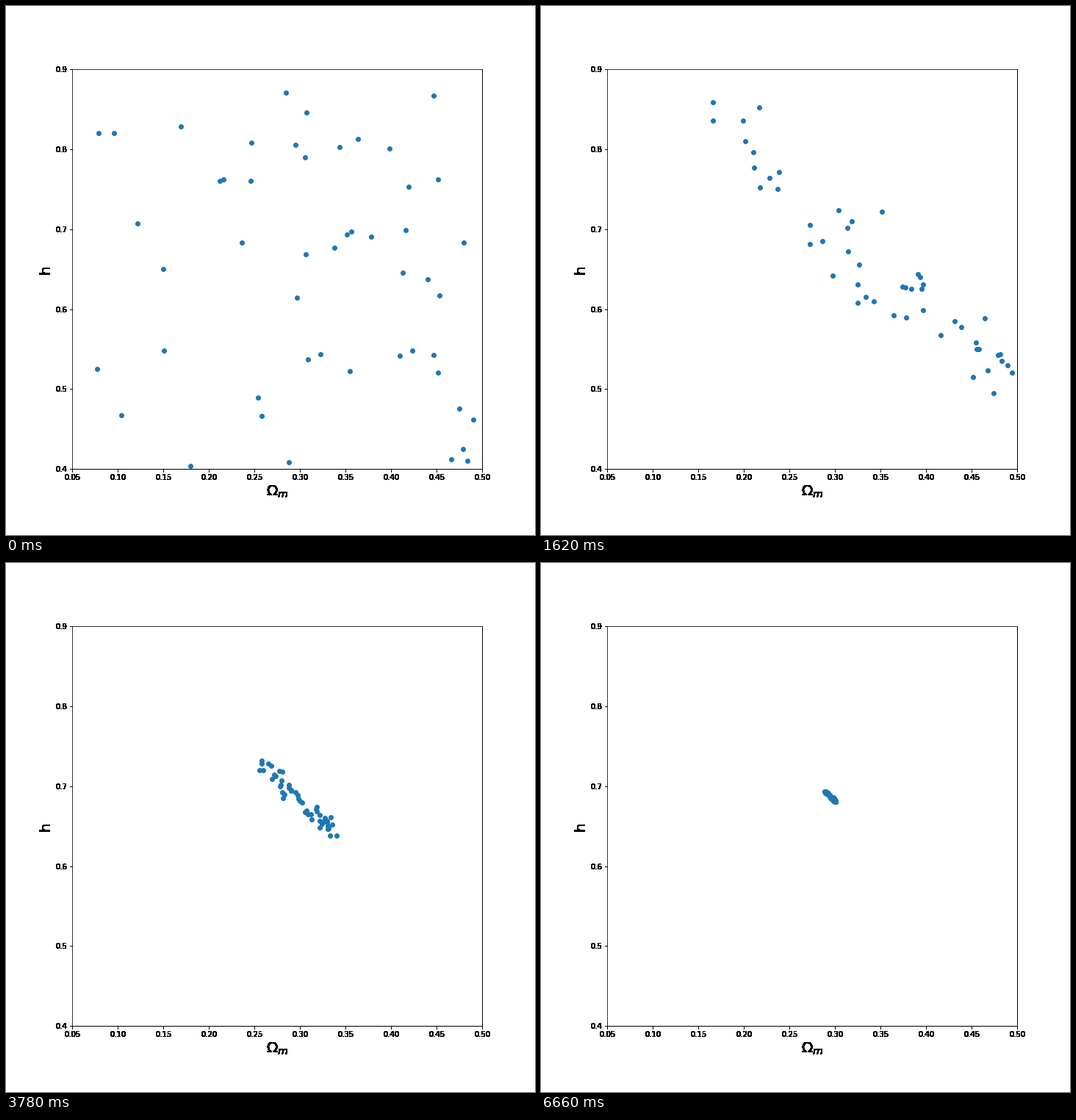
These frames come from a looping animation (720 by 720 pixels, 8000 ms). A matplotlib script:

```python
import numpy as np
import matplotlib.pyplot as plt
from matplotlib.animation import FuncAnimation

SIZE, DPI = 720, 72
LOOP_MS, TICK_MS, STEP_MS, LAST_STEP = 8000, 40, 180, 37
PARTICLES = 50
OMEGA_LIM, H_LIM = (0.05, 0.50), (0.4, 0.9)
OMEGA_FIT, H_FIT, SLOPE = 0.295, 0.687, 0.45


def population(step):
    """Particles scattered along h ~ omega^-SLOPE, closing in on the best fit."""
    rng = np.random.RandomState(step)
    reach = 2 * np.exp(-0.123 * step)
    spread = 0.07 * reach + 0.9 * np.exp(-0.5 * step)
    low, high = np.clip(OMEGA_FIT * np.exp([-reach, reach]), *OMEGA_LIM)
    omega = rng.uniform(low, high, 40 * PARTICLES)
    ridge = H_FIT * (omega / OMEGA_FIT) ** -SLOPE
    h = ridge * np.exp(spread * rng.normal(size=omega.size))
    inside = (h > H_LIM[0]) & (h < H_LIM[1])
    return omega[inside][:PARTICLES], h[inside][:PARTICLES]


def harden(image, dpi):
    """Turn every touched pixel solid black, leaving no soft edges."""
    solid = np.zeros_like(image)
    solid[..., 3] = image[..., 3] > 0
    return solid, 0, 0


plt.rcParams["font.family"] = "DejaVu Sans"
fig, ax = plt.subplots(figsize=(SIZE / DPI, SIZE / DPI), dpi=DPI,
                       facecolor="white")
fig.subplots_adjust(left=0.125, right=0.9, bottom=0.125, top=0.88)
ax.set_xticks(np.arange(10) * 0.05 + 0.05)
ax.set_yticks(np.arange(6) * 0.1 + 0.4)
ax.set_xlim(OMEGA_LIM)
ax.set_ylim(H_LIM)
ax.set_xlabel(r"$\Omega_m$", fontsize=20)
ax.set_ylabel("h", fontsize=20)
ax.spines[["right", "bottom"]].set_linewidth(1)
for axis in (ax.xaxis, ax.yaxis):
    axis.set_agg_filter(harden)

populations = [population(step) for step in range(LAST_STEP + 1)]
dots, = ax.plot([], [], "o", color="#1f77b4", markersize=6)


def update(frame):
    step = (frame * TICK_MS + TICK_MS // 2) // STEP_MS
    dots.set_data(*populations[min(step, LAST_STEP)])
    return dots,


animation = FuncAnimation(fig, update, frames=LOOP_MS // TICK_MS,
                          interval=TICK_MS, repeat=True, repeat_delay=0)
plt.show()
```
